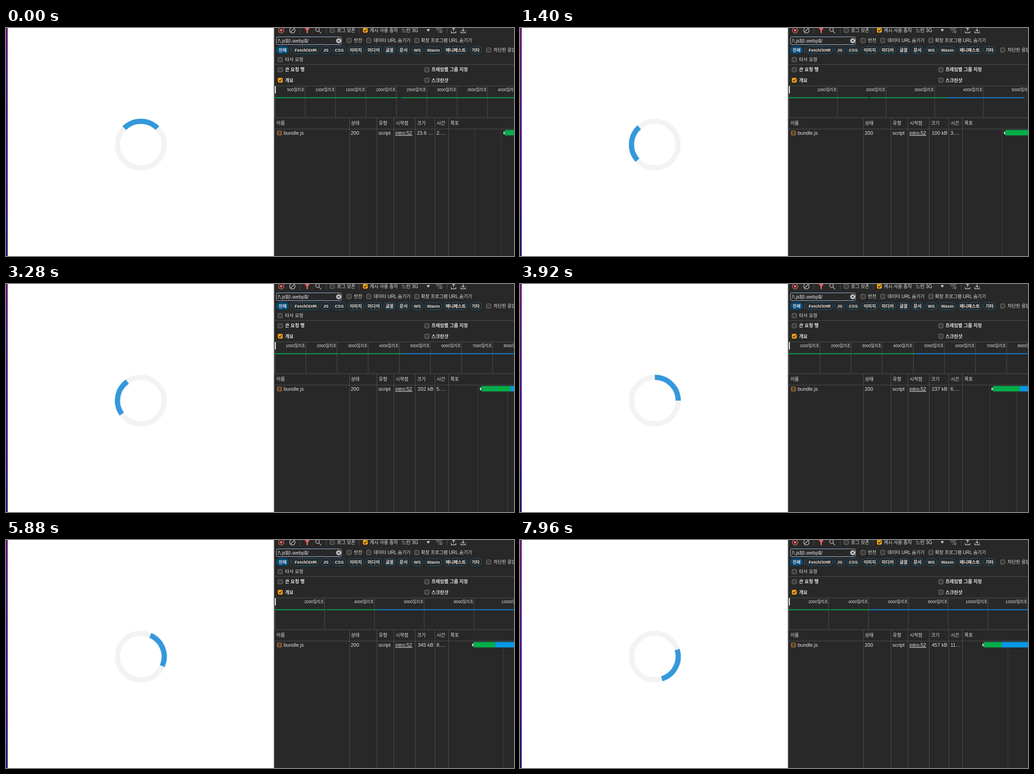
Write an HTML page that moves like this. It is 1114 px wide and 502 px high and loops after 8000 ms.

```html
<!DOCTYPE html>
<html lang="ko">
<head>
<meta charset="utf-8">
<title>네트워크 패널</title>
<style>
  html, body { margin: 0; width: 100%; height: 100%; overflow: hidden; background: #fff; }
  svg { display: block; }
  text { font: 10.1px "Liberation Sans", "Noto Sans CJK KR", "Noto Sans CJK", sans-serif; fill: #e3e3e3; white-space: pre; }
  .bold text { font-weight: 700; }
  text.cell { font-size: 11px; }
  #chips text { font-size: 9.6px; font-weight: 700; text-anchor: middle; }
  #labels text { font-size: 8.6px; text-anchor: end; }
  .line { fill: none; stroke: #505050; }
  .icon { fill: none; stroke: #c7c7c7; stroke-width: 1.3; }
  #spin { transform-origin: 295.7px 256.7px; animation: spin 8s infinite; }
  /* One step per 40 ms */
  @keyframes spin {
    0%    { transform: rotate(0deg);      animation-timing-function: steps(35); }
    17.5% { transform: rotate(273deg);    animation-timing-function: steps(32); }
    33.5% { transform: rotate(522deg);    animation-timing-function: steps(31); }
    49%   { transform: rotate(765deg);    animation-timing-function: steps(49); }
    73.5% { transform: rotate(1149deg);   animation-timing-function: steps(32); }
    89.5% { transform: rotate(1395deg);   animation-timing-function: steps(20); }
    99.5% { transform: rotate(1557.5deg); animation-timing-function: steps(1); }
    100%  { transform: rotate(1565deg); }
  }
</style>
</head>
<body>
<svg width="1114" height="502" viewBox="0 0 1114 502">
  <defs>
    <linearGradient id="edge" x1="0" y1="0" x2="0" y2="1">
      <stop offset="0" stop-color="#711580"/>
      <stop offset=".55" stop-color="#4a1090"/>
      <stop offset="1" stop-color="#2a1278"/>
    </linearGradient>
  </defs>

  <rect width="3" height="502" fill="url(#edge)"/>
  <rect x="3" width=".7" height="502" fill="#1c1030"/>

  <g fill="none" stroke-width="11.5">
    <circle cx="295.7" cy="256.7" r="51.2" stroke="#f3f3f3"/>
    <path id="spin" d="M259.5 220.5A51.2 51.2 0 0 1 331.9 220.5" stroke="#3498db"/>
  </g>

  <rect x="587.5" width="527" height="502" fill="#282828"/>
  <path class="line" d="M588.5 0V502M589 80.5H1114M589 127.5H1114M589 197.5H1114M589 222.5H1114
    M644.5 0V12M702.5 0V12M774.5 0V12M967.5 0V12M624.5 42V56"/>

  <!-- Toolbar -->
  <g class="icon">
    <g stroke="#e46962">
      <circle cx="603.5" cy="5" r="6"/>
      <rect x="601" y="2.5" width="5" height="5" fill="#e46962" stroke="none"/>
    </g>
    <circle cx="628" cy="5" r="6"/>
    <path d="M632 1L624 9"/>
    <path d="M655 0H666L662 5.5V11H659V5.5Z" fill="#e46962" stroke="none"/>
    <circle cx="683" cy="3.5" r="4"/>
    <path d="M686 6.5L691 11.5"/>
    <path d="M922 2.5H930L926 8Z" fill="#c7c7c7" stroke="none"/>
    <g stroke="#8f8f8f">
      <path d="M943 2.5Q949.5 -2.5 956 2.5M945.5 5.5Q949.5 2 953 4.5M947.5 8L949.5 10"/>
      <circle cx="954" cy="8" r="2.3"/>
    </g>
    <path d="M981.5 7V0M978.5 2.5L981.5 -.5L984.5 2.5M976.5 7V10.5H986.5V7"/>
    <path d="M1002.5 0V7M999.5 4L1002.5 7L1005.5 4M997.5 7V10.5H1007.5V7"/>
  </g>
  <text x="726" y="8.5">로그 보존</text>
  <text x="798" y="8.5">캐시 사용 중지</text>
  <text x="868" y="8.5" style="font-size:10.4px">느린 3G</text>

  <!-- Filter -->
  <rect x="593" y="19.5" width="142.5" height="17" rx="3" fill="#282828" stroke="#a0bfe8"/>
  <text class="cell" x="596" y="32">/\.js$|\.webp$/</text>
  <circle cx="729.5" cy="28" r="5.5" fill="#c7c7c7"/>
  <path d="M727.3 25.8L731.7 30.2M731.7 25.8L727.3 30.2" stroke="#282828" stroke-width="1.2"/>
  <text x="763" y="31">반전</text>
  <text x="806" y="31">데이터 URL 숨기기</text>
  <text x="910" y="31">확장 프로그램 URL 숨기기</text>
  <g id="chips"></g>
  <text x="1069" y="52">차단된 응답 쿠키</text>
  <text x="612" y="73">타사 요청</text>
  <g class="bold">
    <text x="612" y="95.3">큰 요청 행</text>
    <text x="933" y="95.3">프레임별 그룹 지정</text>
    <text x="612" y="118.5">개요</text>
    <text x="933" y="118.5">스크린샷</text>
  </g>
  <g id="boxes"></g>

  <!-- Overview -->
  <path id="grid" class="line"/>
  <g id="labels"></g>
  <g stroke-width="2">
    <path id="wait" stroke="#0aa84a"/>
    <path id="load" stroke="#0e86d8"/>
  </g>
  <rect x="589.5" y="128" width="2.5" height="16" fill="#d8d8d8"/>

  <!-- Request table -->
  <path id="fallGrid" class="line" stroke-opacity=".65"/>
  <path class="line" d="M753.5 198V502M813.5 198V502M850.5 198V502M897.5 198V502M940.5 198V502M970.5 198V502"/>
  <text x="593" y="213">이름</text>
  <text x="756.5" y="213">상태</text>
  <text x="817.5" y="213">유형</text>
  <text x="854.5" y="213">시작점</text>
  <text x="901.5" y="213">크기</text>
  <text x="944.5" y="213">시간</text>
  <text x="974.5" y="213">폭포</text>
  <rect x="595.5" y="227" width="8.5" height="8.5" rx="1" fill="none" stroke="#f29b38" stroke-width="1.2"/>
  <path d="M599 229.5L597.5 231.3L599 233M600.7 229.5L602.2 231.3L600.7 233" fill="none" stroke="#f29b38"/>
  <text class="cell" x="609" y="235">bundle.js</text>
  <text class="cell" x="756" y="235">200</text>
  <text class="cell" x="817" y="235">script</text>
  <text class="cell" x="854" y="235" text-decoration="underline">intro:52</text>
  <text class="cell" id="size" y="235"></text>
  <text class="cell" id="time" x="944" y="235"></text>
  <rect id="tick" y="228" width="2.5" height="6" fill="#e0e0e0"/>
  <rect id="green" y="224.5" height="12" fill="#05ac49"/>
  <rect id="blue" y="224.5" height="12" fill="#0898e5"/>
</svg>

<script>
const $ = id => document.getElementById(id);

function add(parent, tag, attrs, text = '') {
  const node = document.createElementNS('http://www.w3.org/2000/svg', tag);
  set(node, attrs);
  node.textContent = text;
  return parent.appendChild(node);
}

function set(node, attrs) {
  for (const key in attrs) node.setAttribute(key, attrs[key]);
}

// Filter chips: left, right, label
[[593, 620, '전체'], [628.5, 686, 'Fetch/XHR'], [690.5, 712, 'JS'], [716.5, 745, 'CSS'],
 [749.5, 784.5, '이미지'], [788.5, 824, '미디어'], [828.5, 854, '글꼴'], [858.5, 885, '문서'],
 [889.5, 914.5, 'WS'], [918.5, 956, 'Wasm'], [960.5, 1012, '매니페스트'], [1016.5, 1043, '기타']
].forEach(([left, right, label], i) => {
  add($('chips'), 'rect', { x: left, y: 40.5, width: right - left, height: 16, rx: 7.5,
    fill: i ? 'none' : '#004a77', stroke: i ? '#0d5c8c' : '#004a77' });
  add($('chips'), 'text', { x: (left + right) / 2, y: 52 }, label);
});

// Checkboxes: centre, checked
[[715.5, 5], [788, 5, true], [752.5, 27.5], [795.5, 27.5], [901, 27.5], [1058.5, 48.5],
 [601.5, 69.5], [601.5, 92], [923, 92], [601.5, 115, true], [923, 115]
].forEach(([x, y, checked]) => {
  add($('boxes'), 'rect', { x: x - 4.8, y: y - 4.8, width: 9.6, height: 9.6, rx: 2,
    fill: checked ? '#ffa50a' : '#3a3a3a', stroke: checked ? '#ffa50a' : '#858585' });
  if (checked) add($('boxes'), 'path', { d: `M${x - 3} ${y}l2.2 2.5l4 -5`,
    fill: 'none', stroke: '#282828', 'stroke-width': 1.6 });
});

const labels = Array.from({ length: 9 }, () => add($('labels'), 'text', { y: 139.3 }));

const LOOP = 8000, STEP = 40;
const RIGHT = 1114, LEFT = 589.5, FALL = 971;
const RATE = 1.087;                               // page time per playback time
const ZOOMS = [320, 1440, 2840, 4560, 6760];      // overview shrinks by a fifth
const SIZES = [[0, 23.6], [1400, 100], [2680, 169], [3920, 237], [5880, 345], [7160, 414], [7960, 457]];

const overviewScale = t => 0.1333 * 0.8 ** ZOOMS.filter(z => t >= z).length;
const sliceFor = scale => [500, 1000, 2000, 5000].find(ms => ms * scale >= 56);

function sizeAt(t) {
  const i = SIZES.findIndex(([end]) => end >= t);
  if (i < 1) return SIZES[0][1];
  const [[t0, a], [t1, b]] = [SIZES[i - 1], SIZES[i]];
  return a + (b - a) * (t - t0) / (t1 - t0);
}

function drawOverview(t, now) {
  const scale = overviewScale(t), slice = sliceFor(scale);
  let d = 'M589.5 128V197';
  labels.forEach((label, i) => {
    const ms = (i + 1) * slice, x = LEFT + ms * scale;
    d += `M${x.toFixed(1)} 128V197`;
    label.setAttribute('x', x - 1.5);
    label.textContent = ms + '밀리초';
  });
  $('grid').setAttribute('d', d);

  // The request line rescales one step ahead of the grid.
  const lineScale = overviewScale(t + STEP);
  const at = ms => Math.min(RIGHT, LEFT + ms * lineScale);
  const span = (from, to) => `M${at(from)} 153.5H${at(to)}`;
  $('wait').setAttribute('d', span(0, 2025) + span(2090, 4070));
  $('load').setAttribute('d', span(2033, 2045) + span(2065, 2080) + span(4070, now));
}

function drawWaterfall(now) {
  const scale = 261 / now, slice = sliceFor(scale);
  let d = '';
  for (let x = FALL + slice * scale; x < RIGHT; x += slice * scale) d += `M${x.toFixed(1)} 223V502`;
  $('fallGrid').setAttribute('d', d);

  const offset = 532700 / now;
  const start = FALL + 5.6 + offset;
  const reply = Math.min(RIGHT, FALL + 5.6 + offset * 1.97);
  set($('tick'), { x: start - 3 });
  set($('green'), { x: start, width: reply - start });
  set($('blue'), { x: reply, width: RIGHT - reply });
}

function draw(t) {
  const now = 4538 + t * RATE;
  drawOverview(t, now);
  drawWaterfall(now);

  const size = sizeAt(t);
  $('size').textContent = size < 100 ? size.toFixed(1) + ' …' : Math.round(size) + ' kB';
  $('size').setAttribute('x', size < 100 ? 901 : 903);
  const seconds = Math.floor(2.4 + t * RATE / 1000);
  $('time').textContent = seconds + (seconds < 10 ? '.…' : '…');
}

const begin = performance.now();
function tick() {
  const step = Math.round((performance.now() - begin) / STEP);
  draw(step * STEP % LOOP);
  requestAnimationFrame(tick);
}
tick();
</script>
</body>
</html>
```
